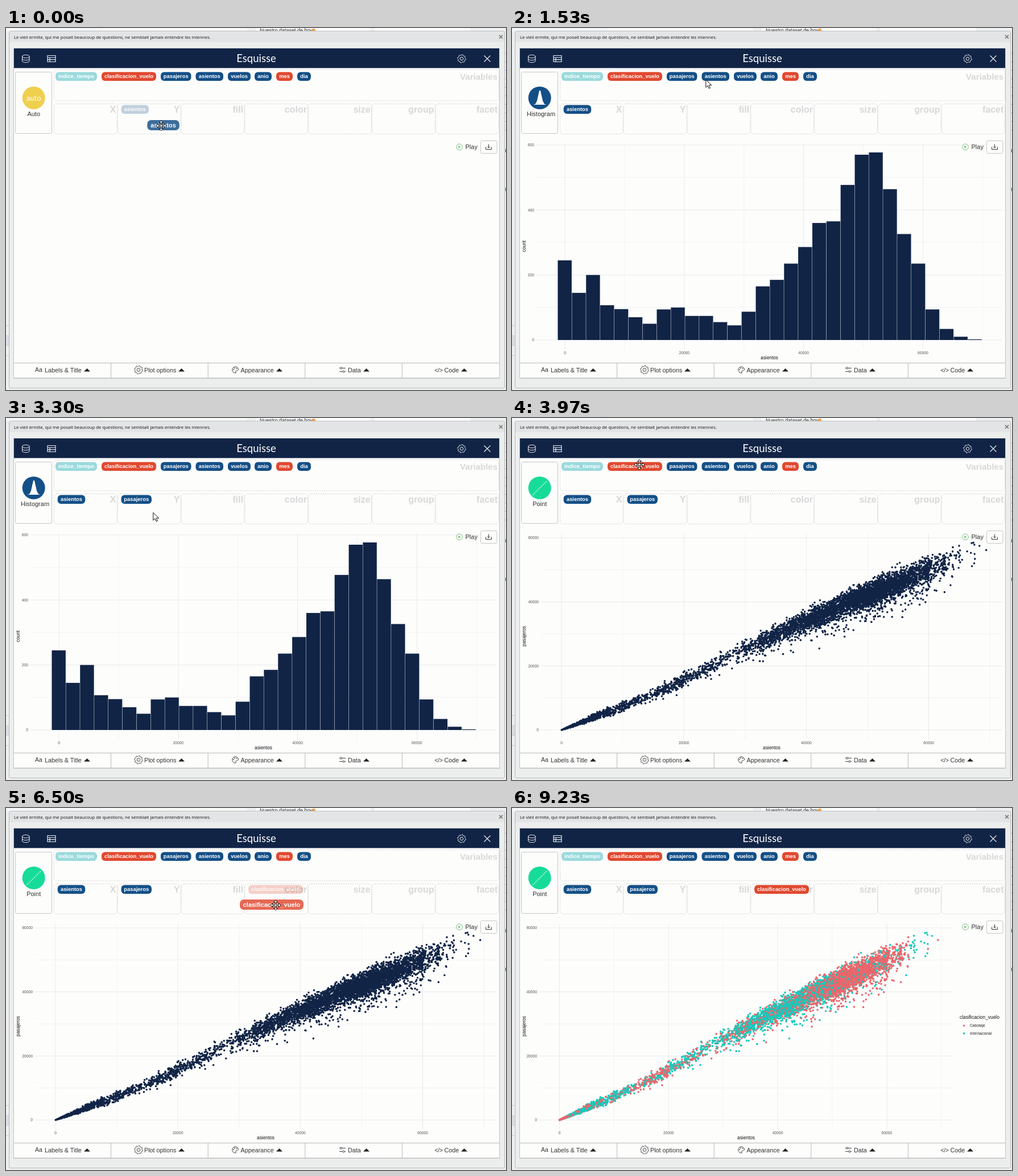
These frames come from a looping animation (879x637 px, 9260 ms). An HTML page:

```html
<!DOCTYPE html>
<html lang="es">
<head>
<meta charset="utf-8">
<title>Drag and drop plot builder</title>
<style>
  html, body { margin: 0; width: 100%; height: 100%; overflow: hidden; background: #eef0f0 }
  svg { display: block; width: 879px; height: 637px; font-family: "Liberation Sans", Arial, sans-serif }
  .b { font-weight: bold }
  .m { text-anchor: middle }
  .e { text-anchor: end }
  .n { fill: none }
</style>
</head>
<body>
<svg id="stage" viewBox="0 0 879 637"></svg>
<script>
const LOOP = 9260, NAVY = '#112446', BLUE = '#144f87', RED = '#e1482f', PAPER = '#fdfdfc';
const stage = document.getElementById('stage');

const rect = (x, y, w, h, fill, more = '') =>
  `<rect x="${x}" y="${y}" width="${w}" height="${h}" fill="${fill}" ${more}/>`;
const text = (x, y, size, str, fill = '#333', more = '') =>
  `<text x="${x}" y="${y}" font-size="${size}" fill="${fill}" ${more}>${str}</text>`;
const path = (d, stroke, width = 1, more = 'class="n"') =>
  `<path d="${d}" stroke="${stroke}" stroke-width="${width}" ${more}/>`;
const circle = (x, y, r, fill, more = '') =>
  `<circle cx="${x}" cy="${y}" r="${r}" fill="${fill}" ${more}/>`;
const group = (id, body) => `<g id="${id}">${body}</g>`;
const clamp = (v, lo = 0, hi = 1) => Math.min(hi, Math.max(lo, v));
const ramp = (a, b, v) => clamp((v - a) / (b - a));

// Chips: name, left edge, width, colour
const VARS = [
  ['indice_tiempo', 87, 73, '#9ad9dc'], ['clasificacion_vuelo', 168, 96, RED],
  ['pasajeros', 272, 53.5, BLUE], ['asientos', 333.5, 48.5, BLUE],
  ['vuelos', 390, 40, BLUE], ['anio', 437, 30, BLUE], ['mes', 475, 29, RED], ['dia', 512, 24, BLUE]
];
const SLOTS = ['X', 'Y', 'fill', 'color', 'size', 'group', 'facet'];
const slotX = i => 84.5 + 111.8 * i;

function chip([name, , w, fill], cx, cy, scale = 1, opacity = 1) {
  return `<g transform="translate(${cx} ${cy}) scale(${scale})" opacity="${opacity}">` +
    rect(-w / 2, -7.8, w, 15.6, fill, 'rx="6"') + text(0, 3, 9.4, name, '#fff', 'class="b m"') + '</g>';
}
const slotChip = (v, slot, opacity) =>
  chip(VARS[v], slotX(slot) + 6.2 + VARS[v][2] / 2, 143.3, 1, opacity);

function gear(x, y, color) {
  const rim = Array.from({ length: 32 }, (_, i) => {
    const r = i % 4 < 2 ? 7.3 : 6, a = (i + 0.5) * Math.PI / 16;
    return `${(x + r * Math.cos(a)).toFixed(1)} ${(y + r * Math.sin(a)).toFixed(1)}`;
  });
  return path(`M${rim.join('L')}Z`, color, 1, 'class="n" stroke-linejoin="round"') +
    circle(x, y, 2.8, 'none', `stroke="${color}"`);
}

function backdrop() {
  return rect(0, 0, 879, 637, '#eef0f0') + rect(0, 0, 166, 6, '#f5f6f8') + rect(167, 0, 257, 6, '#f8f8f6') +
    rect(439, 0, 202, 6, '#fff') + rect(647, 0, 169, 6, '#fff') +
    text(446, 7, 9, 'Nuestro dataset de hoy', '#222') + circle(541, 4, 3, '#f2a04a') +
    path('M0 523.5H5M0 541.5H5M0 558.5H5M0 576.5H5', '#c9cbd0') + rect(0, 542, 5, 16, '#dcdee2') +
    path('M878.5 44v150', '#a33', 1, 'class="n" stroke-dasharray="1 14"') +
    path('M878.5 213v6M878.5 281v6', '#733');
}

function frameWindow() {
  return rect(5.5, 5.5, 871, 628, '#eceeee', 'stroke="#b3b6bc" rx="2"') + rect(6, 7, 870, 18, '#e2e4e5') +
    text(14, 19, 7.8, 'Le vieil ermite, qui me posait beaucoup de questions, ne semblait jamais entendre les miennes.',
      '#111', `style="font-family:'Open Sans','Noto Sans',sans-serif"`) +
    path('M867 12.5l6 6m0-6l-6 6', '#77736c', 1.6) +
    rect(13.5, 35.5, 854, 581, PAPER, 'stroke="#c3c4c4"');
}

function header() {
  const w = '#e8ebf0';
  return rect(14, 36, 853, 34.5, NAVY) +
    text(440, 60, 18.5, 'Esquisse', '#fff', 'class="m" style="font-family:Lato,sans-serif"') +
    path('M28.5 50a6.3 2.7 0 0 1 12.6 0a6.3 2.7 0 0 1-12.6 0v8a6.3 2.7 0 0 0 12.6 0v-8M28.5 54a6.3 2.7 0 0 0 12.6 0', w) +
    path('M73 48.5h14v11h-14zM73 52h14M73 55.7h14M77 52v7.5', w, 1.2) +
    gear(801, 54, w) + path('M840.5 48.5l11 11m0-11l-11 11', w, 1.2);
}

function dropZones() {
  const dash = 'stroke="#d9d9d6" stroke-dasharray="2.5 1.5" rx="5"', grey = '#d8d8d8';
  return rect(16.5, 77.5, 64, 108, PAPER, 'stroke="#c6c6c6" rx="2"') +
    rect(84.5, 73.5, 782, 54.5, 'none', dash) + text(864, 91, 15, 'Variables', grey, 'class="b e"') +
    SLOTS.map((s, i) => rect(slotX(i), 133.5, 110.8, 53, 'none', dash) +
      text(slotX(i) + 109, 149, 16, s, grey, 'class="b e"')).join('') +
    VARS.map(v => chip(v, v[1] + v[2] / 2, 85.2)).join('');
}

function footer() {
  const items = [['Labels &amp; Title', 68, 137], ['Plot options', 243, 303], ['Appearance', 412.5, 475],
    ['Data', 601, 628], ['Code', 770.5, 800]];
  return path('M14 589.5H867M14 616H867', '#b9b9b9') +
    items.map(([s, x, c], i) => (i ? path(`M${14 + 170.6 * i} 589v27`, '#b9b9b9') : '') +
      text(x, 606, 10.8, s) + `<path d="M${c} 604.5l5.5-5.5 5.5 5.5z" fill="#222"/>`).join('') +
    text(51, 605, 10.5, 'Aa') + gear(233, 601.5, '#444') +
    path('M404 607a5.5 5.5 0 1 1 4.5-7c1 4-4.5 1.5-4.5 4z', '#444') +
    [[400, 601], [402, 598.5], [405.5, 599]].map(p => circle(...p, 0.9, '#444')).join('') +
    path('M586 598.5h11M586 604.5h11', '#444') + circle(589, 598.5, 1.6, '#fff', 'stroke="#444"') +
    circle(593.5, 604.5, 1.6, '#fff', 'stroke="#444"') + text(753.5, 605.5, 10, '&lt;/&gt;');
}

function playBar() {
  return circle(797, 209.3, 5.3, PAPER, 'stroke="#79bd7c"') + '<path d="M795.3 206.8l4 2.5-4 2.5z" fill="#79bd7c"/>' +
    text(807.5, 213, 11, 'Play') + rect(834.5, 198.5, 28.5, 22, PAPER, 'stroke="#c6c6c6" rx="2"') +
    path('M843.5 209.5v4h10v-4M848.5 204.5v6.5m-2.5-2.5l2.5 2.5 2.5-2.5', '#333');
}

// Grid and labels for a panel from x0 to x1; zero and unit give the horizontal scale per 20000
function axes(x0, x1, zero, unit, xMax, yStep, yUnit, xTitle, yTitle) {
  let out = '';
  for (let i = 0; i < 8; i++) {
    const x = zero + i * unit / 2, y = 549 - i * yUnit / 2, color = i % 2 ? '#f3f3f4' : '#ebebee';
    if (x < x1) out += path(`M${x} 203V566`, color);
    if (y > 204) out += path(`M${x0} ${y}H${x1}`, color);
    if (i % 2) continue;
    if (x < xMax) out += text(x, 574, 6.7, i * 10000, '#555', 'class="m"');
    if (y > 204) out += text(x0 - 4, y + 2.3, 6.7, i / 2 * yStep, '#555', 'class="e"');
  }
  return out + text((x0 + x1) / 2, 583, 8.3, xTitle, '#111', 'class="m"') +
    text(0, 0, 8.3, yTitle, '#111', 'class="m" transform="translate(24 384) rotate(-90)"');
}

// Flights per bin of seats
const COUNTS = [245, 145, 200, 107, 95, 70, 50, 94, 100, 74, 74, 55, 45, 87, 165,
  185, 235, 286, 360, 365, 477, 570, 577, 464, 326, 235, 94, 34, 10, 2];
const BIN = 2371;

function histogram() {
  return axes(43, 862, 93, 209.8, 800, 200, 114.4, 'asientos', 'count') +
    COUNTS.map((n, i) => rect(80.5 + i * 24.86, 549 - n * 0.572, 24.4, n * 0.572, NAVY)).join('');
}

let seed = 11;
function rnd() {
  seed = (seed + 0x6D2B79F5) | 0;
  let t = Math.imul(seed ^ seed >>> 15, 1 | seed);
  t = t + Math.imul(t ^ t >>> 7, 61 | t) ^ t;
  return ((t ^ t >>> 14) >>> 0) / 4294967296;
}
const gauss = () => (rnd() + rnd() + rnd() + rnd() - 2) * 1.73;

function redShare(x) {
  const steps = [[1200, 0.9], [14000, 0.25], [20000, 0.65], [34000, 0.3], [45000, 0.28], [50000, 0.55], [64000, 0.85], [1e6, 0.3]];
  return steps.find(s => x < s[0])[1];
}

// Passengers follow the seats, with a spread that grows and a tail of emptier flights
const FLIGHTS = COUNTS.flatMap((n, bin) => Array.from({ length: n }, () => {
  const seats = Math.abs((bin - 0.5 + rnd()) * BIN);
  const load = 0.75 + 0.105 * ramp(15000, 30000, seats) - 0.025 * ramp(45000, 63000, seats);
  let people = seats * load + Math.min(0.09 * seats, 450 + 0.026 * seats) * gauss();
  if (rnd() < 0.18) people += 0.06 * seats * Math.log(1 - rnd() * 0.95);
  return { seats, people: clamp(people, 0.5 * seats, 0.97 * seats), red: rnd() < redShare(seats) };
}));

function dots(zero, unit, color, keep) {
  const d = FLIGHTS.filter(keep).map(f =>
    `M${(zero + f.seats * unit / 20000).toFixed(1)} ${(549 - f.people * 0.005633).toFixed(1)}h.01`).join('');
  return path(d, color, 3.6, 'class="n" stroke-linecap="round"');
}

function scatter() {
  return axes(51, 862, 87, 215.2, 800, 20000, 112.7, 'asientos', 'pasajeros') + dots(87, 215.2, NAVY, () => true);
}

function colored() {
  const red = '#ea666b', teal = '#17c9bb', layers = 12;
  let out = axes(48, 775, 83.5, 191.8, 770, 20000, 112.7, 'asientos', 'pasajeros');
  for (let k = 0; k < layers; k++) {
    out += dots(83.5, 191.8, teal, (f, i) => i % layers === k && !f.red) +
      dots(83.5, 191.8, red, (f, i) => i % layers === k && f.red);
  }
  return out + text(787, 371, 8.4, 'clasificacion_vuelo', '#111') +
    circle(794.5, 383, 1.8, red) + text(805, 385.2, 6.7, 'Cabotaje', '#222') +
    circle(794.5, 396.6, 1.8, teal) + text(805, 399, 6.7, 'Internacional', '#222');
}

function geoms() {
  const label = (x, s) => text(x, 155, 11, s, '#333', 'class="m"');
  return group('autoIcon', circle(48.7, 123, 20, '#efcf4e') +
      text(48.7, 128, 13, 'auto', '#fff', 'class="m" style="font-family:Lato,sans-serif"') + label(48.7, 'Auto')) +
    group('histIcon', circle(48.7, 123, 20, BLUE) +
      '<path d="M37 135l4-1 3-6 2-9 2-9h2l2 9 2 9 3 6 4 1z" fill="#fff"/>' + label(51, 'Histogram')) +
    group('pointIcon', circle(48.7, 123, 20, '#17dc99') +
      path('M37 135L61 111', '#fff', 1.7, 'class="n" stroke-linecap="round" stroke-dasharray=".1 3.5"') + label(48.7, 'Point'));
}

const ARROW = '<path d="M0 0v13.5l3.2-3 2.2 5 2.2-1-2.2-4.8h4.4z" fill="#fff" stroke="#111"/>';
const MOVE = '<path d="M0-9l3.5 3.5h-2.5v4.5h4.5v-2.5l3.5 3.5-3.5 3.5v-2.5h-4.5v4.5h2.5l-3.5 3.5-3.5-3.5h2.5v-4.5h-4.5v2.5l-3.5-3.5 3.5-3.5v2.5h4.5v-4.5h-2.5z" fill="#fff" stroke="#111"/>';

// Pointer path: time, x, y
const TRACK = [[0, 273, 172], [250, 225, 172], [500, 150, 165], [650, 140, 162], [1000, 170, 158], [1300, 320, 100],
  [1530, 341, 91], [1750, 305, 87], [2000, 298, 86], [2650, 258, 168], [3500, 259, 166], [3800, 230, 100],
  [3970, 224, 82], [5600, 226, 84], [5770, 258, 89], [6400, 474, 171], [7500, 474, 171], [8200, 900, 300]];

function pointer(t) {
  const i = Math.max(1, TRACK.findIndex(k => k[0] > t));
  const a = TRACK[i - 1], b = TRACK[i], p = ramp(a[0], b[0], t);
  return [a[1] + (b[1] - a[1]) * p, a[2] + (b[2] - a[2]) * p];
}

// Drags: variable, slot, start, drop, offset from pointer
const DRAGS = [[3, 0, 0, 650, 3.5], [2, 1, 2000, 2900, 0], [1, 3, 5600, 6800, -7]];
const LAG = 35;

stage.innerHTML = backdrop() + frameWindow() + header() + dropZones() + geoms() +
  group('hist', histogram()) + group('scatter', scatter()) + group('colored', colored()) +
  playBar() + footer() + group('live', '');

const part = id => document.getElementById(id);
const live = part('live');
const SPANS = { autoIcon: [0, 850], histIcon: [850, 3800], pointIcon: [3800, LOOP],
  hist: [850, 3800], scatter: [3800, 7300], colored: [7300, LOOP] };

function draw(t) {
  for (const id in SPANS) {
    part(id).style.display = t >= SPANS[id][0] && t < SPANS[id][1] ? '' : 'none';
  }
  let out = '', moving = (t > 1700 && t < 2000) || (t > 3900 && t < 5600);
  for (const [v, slot, start, drop, dx] of DRAGS) {
    if (t >= drop) out += slotChip(v, slot, 1);
    else if (t >= start) {
      const [x, y] = pointer(Math.max(0, t - LAG));
      if (y > 133) out += slotChip(v, clamp(Math.floor((x - 84) / 111.8), 0, 6), 0.25);
      out += chip(VARS[v], x + dx, y - 1, 1.166, 0.82);
      moving = true;
    }
  }
  if (t < 8200) {
    const [x, y] = pointer(t);
    out += `<g transform="translate(${x} ${y})">${moving ? MOVE : ARROW}</g>`;
  }
  live.innerHTML = out;
}

const begin = performance.now();
function tick() {
  draw((performance.now() - begin) % LOOP);
  requestAnimationFrame(tick);
}
tick();
</script>
</body>
</html>
```
